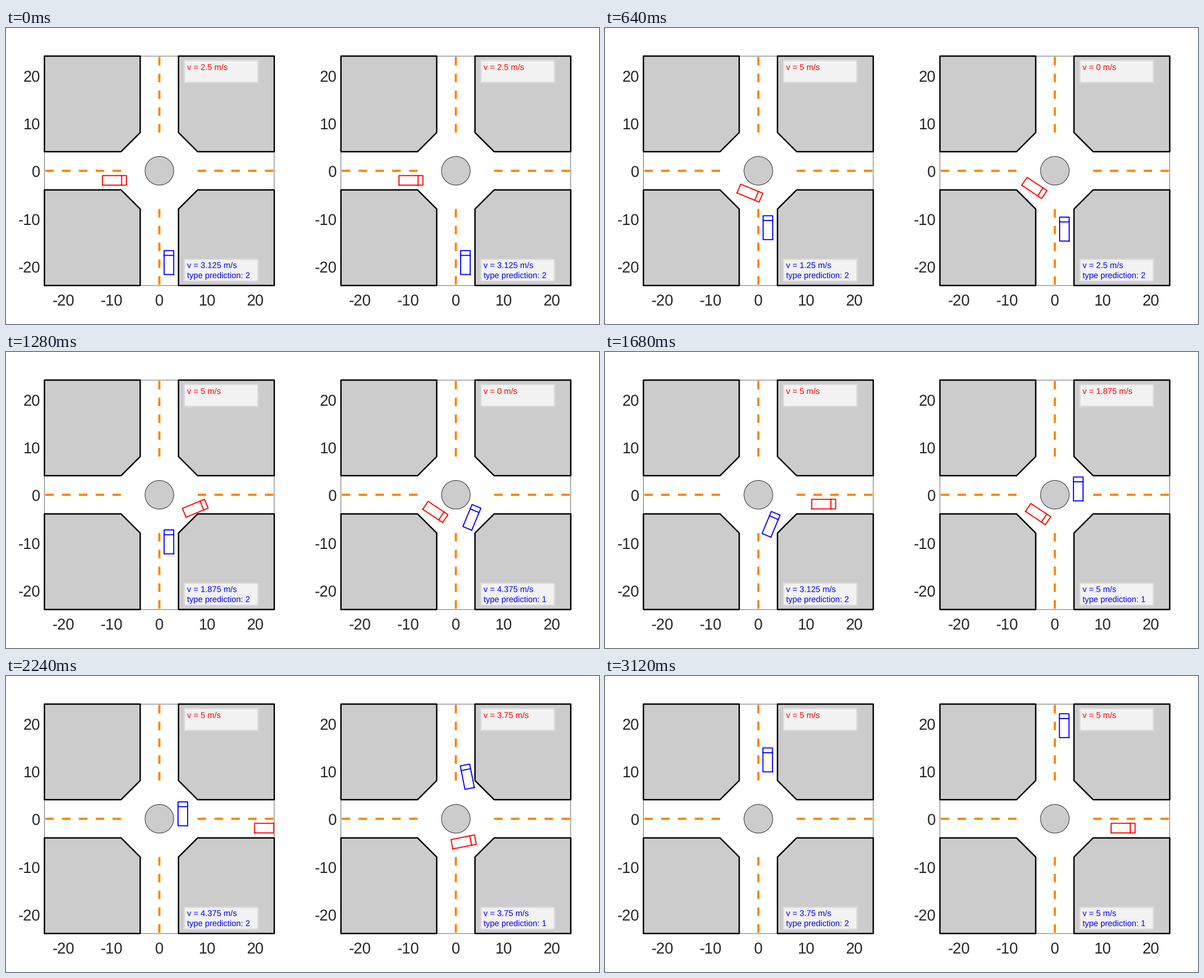
Animation of 1058x529 px, one loop 3.2 s. Source, as a matplotlib script:

```python
import numpy as np
import matplotlib.pyplot as plt
from matplotlib.animation import FuncAnimation
from matplotlib.patches import Circle, Polygon, Rectangle

W, H, DPI = 1058, 529, 64
FRAMES, INTERVAL = 40, 80
PT = 72 / DPI                # points per pixel
SIDE, HALF = 410, 24         # panel size in pixels, half range in metres
M = SIDE / (2 * HALF)        # pixels per metre
TOP, LEFTS = 50.2, (68.6, 597.6)
DT, V_STEP, V_MAX, TURN = 0.25, 0.625, 5, np.pi / 16

plt.rcParams.update({"font.family": "Liberation Sans", "path.snap": False,
                     "text.hinting": "none"})
fig = plt.figure(figsize=(W / DPI, H / DPI), dpi=DPI, facecolor="white")


def hermite(t, knots):
    """Value and slope of a cubic through (t, value, slope) knots."""
    k, y, m = np.array(knots, float).T
    t = np.clip(t, k[0], k[-1])
    i = np.clip(np.searchsorted(k, t, "right") - 1, 0, len(k) - 2)
    h = k[i + 1] - k[i]
    u = (t - k[i]) / h
    rise = y[i + 1] - y[i]
    a = m[i] * h - rise
    b = rise - m[i + 1] * h
    bend = a * (1 - u) + b * u
    value = y[i] + u * rise + u * (1 - u) * bend
    slope = (rise + (1 - 2 * u) * bend + u * (1 - u) * (b - a)) / h
    return value, slope


# Every car takes the same way round the island: offset from the centre
# line against the position along the road.
WAY = [(-9.2, 2, 0), (-3.4, 4.1, 0.6), (-1.76, 4.67, 0.33), (1.4, 4.87, -0.1),
       (7.5, 2.82, -0.38), (12, 1.95, 0)]
along = np.linspace(-HALF, 2 * HALF, 2000)
offset, drift = hermite(along, WAY)
arc = np.r_[0, np.cumsum(np.hypot(np.diff(along), np.diff(offset)))]


def drive(marks):
    """Pose and speed per frame from (frame, position along road, speed)."""
    s, ds = hermite(np.arange(FRAMES), [
        (f, np.interp(x, along, arc), v * DT) for f, x, v in marks])
    x = np.interp(s, arc, along)
    y, slope = hermite(x, WAY)
    heading = np.round(-np.arctan(slope) / TURN) * TURN
    v = np.clip(np.round(ds / DT / V_STEP) * V_STEP, 0, V_MAX)
    return np.column_stack([x, -y]), heading, v


def turned(a):
    return np.array([(np.cos(a), np.sin(a)), (-np.sin(a), np.cos(a))])


def local(px, py):
    """Panel-relative pixels (from its top left) to metres."""
    return px / M - HALF, HALF - py / M


def label(ax, px, py, text, size, color, ha="left"):
    return ax.text(*local(px, py), text, fontsize=size * PT, color=color,
                   ha=ha, va="baseline", zorder=8)


def panel(left):
    ax = fig.add_axes([left / W, 1 - (TOP + SIDE) / H, SIDE / W, SIDE / H])
    ax.set(xlim=(-HALF, HALF), ylim=(-HALF, HALF))
    ax.axis("off")

    ax.add_patch(Rectangle((-HALF, -HALF), 2 * HALF, 2 * HALF, fill=False,
                           ec="#262626", lw=0.7 * PT, clip_on=False))
    block = np.array([(4, 24), (4, 8), (8, 4), (24, 4), (24, 24)])
    for sx in (-1, 1):
        for sy in (-1, 1):
            ax.add_patch(Polygon(block * (sx, sy), fc="#cccccc", ec="black",
                                 lw=2.5 * PT, joinstyle="round",
                                 clip_on=False, zorder=2))
    ax.add_patch(Circle((0, 0), 3, fc="#cccccc", ec="black",
                        lw=0.8 * PT, zorder=2))

    # lane dashes run outward from the junction
    for a in 8 + np.arange(5) * 30 / M:
        ends = np.array([a, a + 15.2 / M])
        for dx, dy in ((1, 0), (-1, 0), (0, 1), (0, -1)):
            ax.plot(ends * dx, ends * dy, color="#ff8000", lw=3.8 * PT,
                    solid_capstyle="butt", zorder=3)

    for t in range(-20, 21, 10):
        label(ax, (t + HALF) * M, 446, str(t), 27.5, "#262626", "center")
        label(ax, -7, (HALF - t) * M + 11, str(t), 27.5, "#262626", "right")

    for y in (7.6, 362.9):
        ax.add_patch(Rectangle(local(249.6, y + 39.6), 131.4 / M, 39.6 / M,
                               fc="#f2f2f2", ec="#d9d9d9", lw=2.4 * PT,
                               zorder=7))
    return ax


class Car:
    # body outline followed by the windscreen line
    shape = np.array([(-2.5, -1), (2.5, -1), (2.5, 1), (-2.5, 1), (-2.5, -1),
                      (np.nan, np.nan), (1.5, -1), (1.5, 1)])

    def __init__(self, ax, color, text_y, marks, road=0.0):
        path, heading, self.v = drive(marks)
        self.path, self.heading = path @ turned(road), heading + road
        self.line, = ax.plot([], [], color=color, lw=1.9 * PT,
                             solid_joinstyle="round", zorder=5)
        self.text = label(ax, 254.6, text_y, "", 14.8, color)

    def show(self, i):
        pts = self.shape @ turned(self.heading[i]) + self.path[i]
        self.line.set_data(pts[:, 0], pts[:, 1])
        self.text.set_text(f"v = {self.v[i]:g} m/s")


REDS = (
    [(0, -9.38, 2.5), (8, -1.76, 5), (16, 7.5, 5), (40, 37.4, 5)],
    [(0, -9.38, 2.5), (8, -4.28, 0), (18, -4.28, 0), (21, -3.5, 1.875),
     (28, 1.63, 3.75), (35, 9.24, 5), (39, 14.25, 5)],
)
BLUES = (
    [(0, -19.2, 3.125), (8, -11.9, 1.25), (16, -9.85, 1.875),
     (21, -6.18, 3.125), (28, 1.04, 4.375), (35, 8.82, 5), (39, 12.32, 3.75)],
    [(0, -19.2, 3.125), (8, -12.2, 2.5), (16, -4.72, 4.375), (21, 1.22, 5),
     (28, 8.8, 3.75), (35, 14.48, 4.375), (39, 19.48, 5)],
)

cars, predictions = [], []
for left, red, blue in zip(LEFTS, REDS, BLUES):
    ax = panel(left)
    cars += [Car(ax, "red", 26, red), Car(ax, "blue", 379.8, blue, np.pi / 2)]
    predictions.append(label(ax, 254.6, 396.8, "type prediction: 2", 14.8,
                             "blue"))


def update(i):
    for car in cars:
        car.show(i)
    predictions[1].set_text(f"type prediction: {2 if i < 11 else 1}")
    return []


anim = FuncAnimation(fig, update, frames=FRAMES, interval=INTERVAL,
                     repeat=True, repeat_delay=0, blit=False)
plt.show()
```
